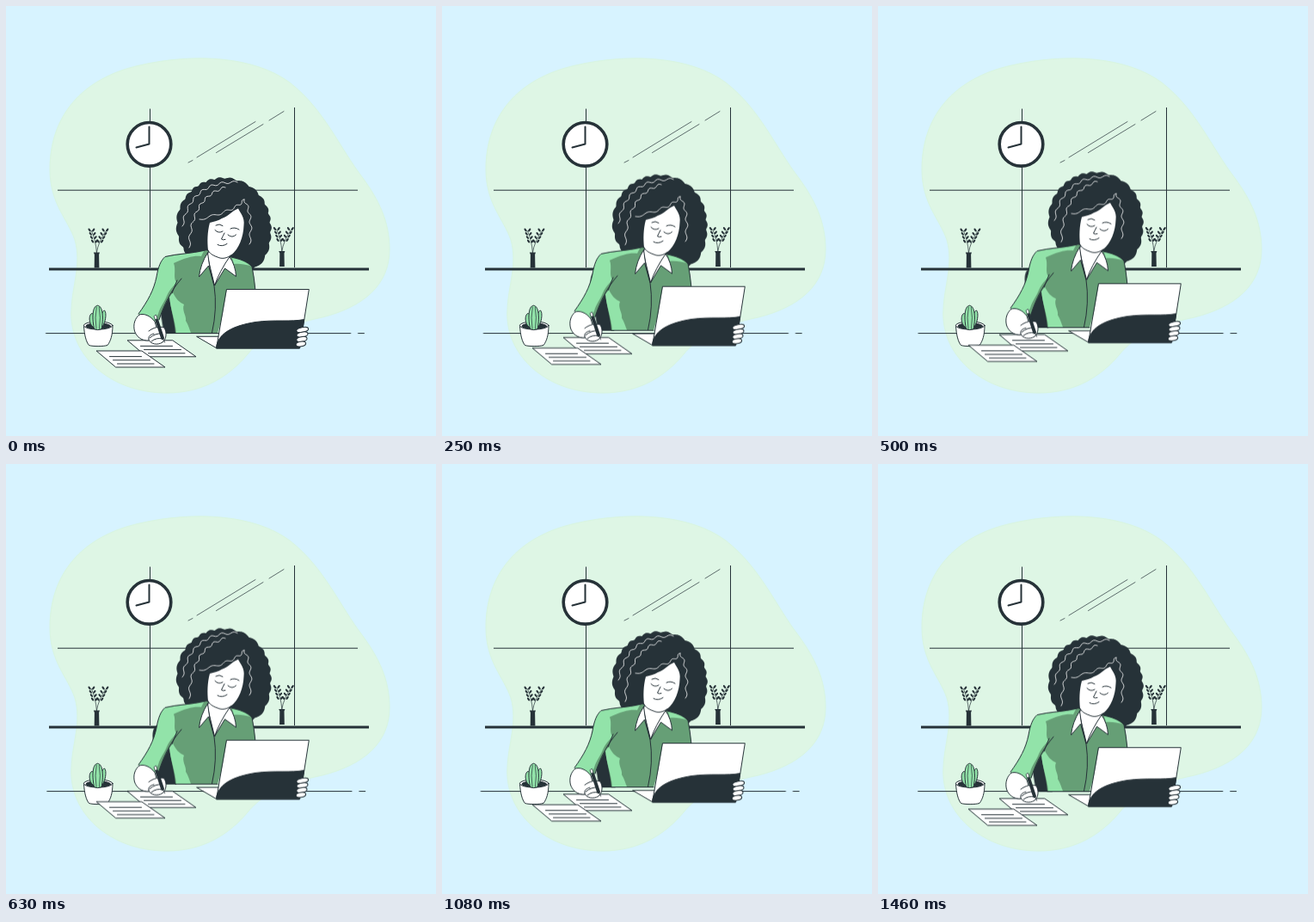
Animation of 500x500 px, one loop 1.5 s. Source, as an HTML page:

```html
<!DOCTYPE html>
<html lang="en">
<head>
<meta charset="utf-8">
<title>Desk work</title>
<style>
  html, body { margin: 0; width: 100%; height: 100%; overflow: hidden; background: #d7f3ff; }
  svg { display: block; width: 100vw; height: 100vh; }
  .ink { fill: none; stroke: #263238; stroke-width: 1; stroke-linecap: round; stroke-linejoin: round; }
  .flat { stroke-linecap: butt; }
  .fine { stroke-width: .7; }
  .bold { stroke-width: 2; }
  .white { fill: #fff; }
  .dark { fill: #263238; }
  .light { fill: #92e3a9; }
  .shade { fill: #669f76; }
  .strand { fill: none; stroke: #fff; stroke-width: .8; stroke-linecap: round; stroke-linejoin: round; }
</style>
</head>
<body>
<svg viewBox="0 0 500 500">
  <defs>
    <g id="plant">
      <path class="dark" d="M-3.600 0H3.600L2.700 2.500 3 18H-2.700L-2.500 2.500Z"/>
      <path class="ink fine" d="M0 0Q-1-14-6-25M0 0Q2-12 10-24"/>
      <g id="leaves" class="dark"></g>
    </g>
    <g id="sheet" class="ink">
      <path class="white" d="M0 0H52.300L79.500 19H22.500Z"/>
      <path d="M15 6.600H52M19 10.800H62M24 15H66.500"/>
    </g>
  </defs>

  <path fill="#def6e5" stroke="#d8f5e1" d="M51 190C51 128 88 84 155 69C220 54 290 59 330 89C370 120 388 165 415 200C433 225 446 250 446 283C446 325 415 350 368 362C325 371 298 384 281 405C260 430 230 450 187 450C120 450 72 405 76 352C77 325 88 300 80 272C72 248 51 230 51 190Z"/>

  <!-- window, shelf, clock -->
  <path class="ink flat" d="M167.500 119.500V304M335.500 118V304M60 214.200H409"/>
  <path class="ink fine" d="M222 176L290 134.500M212 182L217 179.500M244.500 170.500L299 137.500M306 133L323 122.500"/>
  <rect class="dark" x="50" y="304.500" width="372" height="3"/>
  <circle class="white" cx="166.500" cy="160.800" r="25.300" stroke="#263238" stroke-width="3.600"/>
  <path class="ink bold" d="M166.500 140.500V160.500L151.500 164.500"/>
  <use href="#plant" x="105.400" y="286.500"/>
  <use href="#plant" x="320.800" y="285"/>

  <path id="desk" class="ink flat" d="M46.300 380.600H401.300M409.300 380.600H417"/>

  <!-- cactus -->
  <g class="ink">
    <path class="white" d="M90.500 371.500C91 383 93.500 391 96.500 394.500C101 396 113 396 118 394.500C121.500 390 124 383 124 371.500Z"/>
    <ellipse class="white" cx="107.200" cy="371.500" rx="16.800" ry="4.600"/>
    <ellipse class="dark" cx="107.200" cy="372.200" rx="14.300" ry="3.300"/>
    <path class="light" d="M104 375C97 373 95 361 99.500 357.500C103 357 104 366 105 370ZM110 375C116 371 117.500 356 114.500 354C111 354 111 364 109 370Z"/>
    <path class="light" d="M102.500 375.500C100 364 100 349 106.500 348.200C113 349 113.500 364 111 375.500C108 377 105 377 102.500 375.500Z"/>
    <path class="fine" d="M105.300 350Q103 362 105 375.500M108.300 350Q110.500 362 108.500 375.500"/>
  </g>

  <g id="worker">
    <path id="chair" class="dark" d="M176 312C171 314 169.500 321 171 331L179 381H198V335Z"/>
    <path id="hair" class="dark"/>

    <!-- shirt -->
    <path class="shade" d="M185 291.500C199 288 215 288 232 284L262 292C272 294 281 297 286 303C288 311 289 320 290 331L255 350L246 380.500H197C196 366 191 352 190 336Z"/>
    <path class="light" d="M194 333C197 340 202 345 207 347C204 354 210 360 209 366C212 371 213 375 215 380H198C197 366 191 352 190 338Z"/>
    <path class="light" d="M263 293C271 294.500 279 297.500 284 302C278 301 272 299 265 300Z"/>
    <path class="light" d="M184.500 292C199 288.500 215 288.500 230 285L227 291C219 290 210 292 195 299C198 307 194 316 198 321C189 335 182 348 178 364L172 367L154 358C165 343 172 330 175 315C177 303 180 296 184.500 292Z"/>
    <path class="shade" d="M204 317C198 322 191 328 187 337C184 345 179 350 177 358L172 366L178 365C182 353 187 342 193 334Z"/>
    <path class="ink" d="M154 358C165 343 172 330 175 315C177 303 180 296 185 291.500C199 288 215 288 232 284M262 292C272 294 281 297 286 303Q288.500 315 290 331M204 317C192 331 184 346 178 365M193 334Q196 326 199 319M242 325Q246 352 239.500 380M197 380.500H246"/>

    <!-- neck, collar, face -->
    <path class="ink white" d="M236 284L234 290L242.500 325L260 293L261 280Z"/>
    <path class="ink white" d="M234.500 287Q226 300 224.500 315L235.500 302L242 325Q236 305 234.500 287ZM260 291.500Q267 302 267.500 314.500L254.500 305L242.500 325Q248 309 260 291.500Z"/>
    <path class="white" d="M235 284C234 274 234 263 237 252C242 250.500 247 249.500 251 247C258 245 263 238 270 235.500C272 240 278 246 276.500 255C276 269 271 282 262 289.500C257 293.500 251 294.500 246 292C240 290 236 287 235 284Z"/>
    <path class="ink" d="M243 260.500Q247 265 252 262M258 266Q263 270.500 267.500 266M244 255Q248 252.500 252 255.500M261 259Q266 256.500 271 260M254 264Q252 268 250.500 271Q252 272.500 255 271.500M246 277.500Q251 280.500 257 276.500M235 284C236 287 240 290 246 292C251 294.500 257 293.500 262 289.500"/>
    <g id="strands" class="strand"></g>

    <use href="#sheet" x="141.500" y="388.800"/>
    <use href="#sheet" x="105.500" y="401"/>

    <!-- writing hand -->
    <g class="ink">
      <path class="white" d="M155 359C150 363 147.500 370 149.500 378C152 385 158 389.500 166 389L176 377L173 367C168 360 160 357 155 359Z"/>
      <path class="white" d="M166 378C171 374 178 372 184 374C187 379 187 387 182 391C176 395 168 393 166 388C165 384 168 382 172 381"/>
      <path d="M167 386Q174 380 181 381M169 390Q175 385 182 387"/>
      <path d="M182.500 387L184.500 391"/>
      <path stroke-linecap="round" style="stroke-width:4" d="M175.500 366L182 386"/>
      <path class="white fine" d="M172.300 360.500L174.300 359L176 363.500L173.500 364.500Z"/>
    </g>

    <!-- laptop -->
    <g class="ink">
      <path class="white" d="M222 384.300H250L245 397.500Z"/>
      <path class="white" d="M256.800 329.500H352.300L341.500 398H245Z"/>
      <path class="dark" d="M245 394C249 380 263 372 290 367.500C312 364.500 332 367.500 346.700 364.500L341.500 398H245Z"/>
      <g id="fingers" class="white"></g>
    </g>
  </g>
</svg>
<script>
const $ = id => document.getElementById(id);
const { PI, sin, cos, abs, exp, hypot, floor } = Math;
const LOOP = 1500, STEPS = 36, PHASE = .02;

const range = (n, f) => Array.from({ length: n }, (_, i) => f(i));
const line = pts => 'M' + pts.map(p => p.map(v => v.toFixed(2))).join('L');
const oval = (x, y, rx, ry, turn) =>
  `<ellipse rx="${rx}" ry="${ry}" transform="translate(${x} ${y}) rotate(${turn})"/>`;

// round mop of curls, fuller at the lower right
$('hair').setAttribute('d', line(range(240, i => {
  const a = i / 240 * 2 * PI;
  const full = 8 * exp(-(((a - .87) / .5) ** 2));
  const curl = 2 * abs(sin(a * 13 + sin(a * 3))) - 1.2;
  const r = 54.500 - 2.500 * cos(a - 4.360) + full + curl;
  return [252 + r * cos(a), 252 + r * sin(a)];
})) + 'Z');

// quadratic curve with a ripple across it
const strand = (x0, y0, cx, cy, x1, y1, waves) => {
  const pts = range(61, i => {
    const t = i / 60, u = 1 - t;
    const dx = u * (cx - x0) + t * (x1 - cx), dy = u * (cy - y0) + t * (y1 - cy);
    const k = 1.3 * sin(t * waves * 2 * PI) / hypot(dx, dy);
    return [u * u * x0 + 2 * u * t * cx + t * t * x1 - dy * k,
            u * u * y0 + 2 * u * t * cy + t * t * y1 + dx * k];
  });
  return `<path d="${line(pts)}"/>`;
};
$('strands').innerHTML =
  strand(269, 205, 215, 203, 205, 256, 7) +
  strand(255, 211, 215, 222, 213, 281, 7) +
  strand(277, 225, 268, 238, 225, 248, 4) +
  strand(277, 225, 288, 245, 283, 277, 4);

// leaf pairs climbing both stems
$('leaves').innerHTML = range(4, i => {
  const k = i / 3, y = -12 - 13 * k;
  return [-2.5 - 3.5 * k, 4 + 6 * k].map(x =>
    oval(x - 2.3, y - 1, 2.2, 1.1, 50) + oval(x + 2.3, y - 1, 2.2, 1.1, -50)).join('');
}).join('');

$('fingers').innerHTML = range(4, i =>
  oval(344.700 - .2 * i * i, 376.500 + 5.500 * i, 7 - .4 * i, 2.900, -10)).join('');

// held steps, 24 per second
const play = (el, move) => el.animate(range(STEPS + 1, n => ({
  offset: n / STEPS,
  transform: move((n / STEPS + PHASE) % 1),
  easing: 'steps(1, end)'
})), { duration: LOOP, iterations: Infinity, delay: -4 });

const shake = [0, -1, 2, -4, 4, -4, 4, -4, 2, -1, 0];
const swing = p => {
  const i = floor(p * 10);
  return shake[i] + (shake[i + 1] - shake[i]) * (p * 10 - i);
};

play($('worker'), p => `translateY(${.4 - 10 * (1 - abs(2 * p - 1))}px)`);
play($('desk'), p => `translateX(${swing(p)}px)`);
play($('chair'), p => `translateX(${2.5 + 2.5 * cos(2 * PI * (p - .92))}px)`);
</script>
</body>
</html>
```
